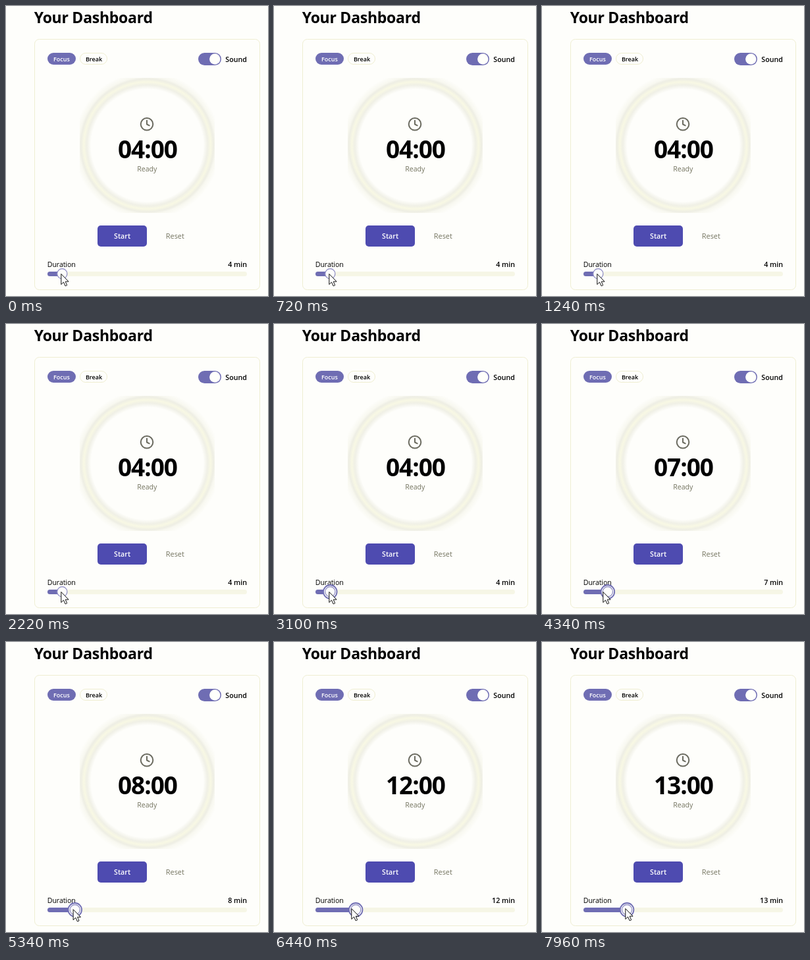
Write an HTML page that moves like this. It is 398 px wide and 440 px high and loops after 8 s.

```html
<!DOCTYPE html>
<html lang="en">
<head>
<meta charset="utf-8">
<title>Focus timer</title>
<style>
  html, body { margin: 0; width: 100%; height: 100%; overflow: hidden; background: #fefefb; }
  svg { display: block; width: 398px; height: 440px; }
  text { font: 400 10.6px "Open Sans", "Noto Sans", sans-serif; fill: #000; }
  .title { font-size: 23px; font-weight: 700; letter-spacing: -.26px; }
  .pill { font-size: 9px; font-weight: 600; }
  .medium { font-size: 10.7px; font-weight: 600; }
  .clock { font-size: 37px; font-weight: 700; letter-spacing: -.028em; }
  .label { font-weight: 500; letter-spacing: -.08px; }
  .muted { fill: #73735f; }
  .light { fill: #fff; }
  .mid { text-anchor: middle; }
  .end { text-anchor: end; }
  .violet { fill: #6f6db3; }
  .line { fill: none; stroke: #efeed2; }
  .icon { fill: none; stroke: #6b6b60; stroke-width: 2; stroke-linecap: round; stroke-linejoin: round; }
</style>
</head>
<body>
<svg viewBox="0 0 398 440">
  <defs>
    <radialGradient id="glow" gradientUnits="userSpaceOnUse" cx="214.5" cy="211.5" r="112">
      <stop offset=".76" stop-color="#fefefb"/>
      <stop offset=".82" stop-color="#f0f0e6"/>
      <stop offset=".86" stop-color="#f8f8e4"/>
      <stop offset=".9" stop-color="#eeeee4"/>
      <stop offset=".93" stop-color="#f8f8f0"/>
      <stop offset="1" stop-color="#fefefb"/>
    </radialGradient>
  </defs>

  <text class="title" x="42.7" y="26">Your Dashboard</text>
  <rect class="line" x="43.5" y="50.5" width="342" height="380" rx="7"/>

  <rect class="violet" x="63" y="71" width="43" height="18" rx="9"/>
  <text class="pill light mid" x="84.5" y="83.5">Focus</text>
  <rect class="line" x="112.5" y="71.5" width="41" height="17" rx="8.5"/>
  <text class="pill mid" x="133.5" y="83.5">Break</text>

  <rect class="violet" x="292" y="71" width="35" height="19" rx="9.5"/>
  <circle cx="317.3" cy="80.5" r="8.2" fill="#fffffb"/>
  <text class="medium end" x="366" y="84.5">Sound</text>

  <rect x="112" y="109" width="205" height="205" fill="url(#glow)"/>
  <circle class="icon" cx="214" cy="179.3" r="9.3"/>
  <path class="icon" d="M214 173.8v5.7l3.7 1.8"/>
  <text class="clock mid" id="clock" x="214.9" y="231">04:00</text>
  <text class="muted mid" x="214.3" y="251">Ready</text>

  <rect x="139" y="333" width="75" height="32" rx="5" fill="#4e4bb0"/>
  <text class="medium light mid" x="176.6" y="353">Start</text>
  <text class="muted mid" x="256.8" y="353" style="font-size:10.9px">Reset</text>

  <text class="label" x="62.8" y="396">Duration</text>
  <text class="medium end" id="minutes" x="366" y="396">4 min</text>
  <rect x="63" y="403" width="303" height="7" rx="3.5" fill="#f6f6e6"/>
  <rect class="violet" id="range" x="63" y="403" width="22" height="7" rx="3.5"/>
  <g id="thumb">
    <circle id="halo" r="10.3" fill="#fefefb" stroke="#6f6db3" stroke-width="1.8"/>
    <circle r="7.6" fill="#fefefb" stroke="#8886c2" stroke-width="1.2"/>
  </g>
  <path id="cursor" d="M0 0V16L3.7 12.5 6.3 18.3 8.9 17.2 6.4 11.6H11.3Z"
        fill="#fff" stroke="#111" stroke-linejoin="round"/>
</svg>
<script>
  const LOOP = 8000, PRESS = 2800;
  const TRACK = { x: 63, width: 303, y: 406.3, pad: 8, min: 1, max: 60 };
  // [time, minutes]
  const values = [[0, 4], [3550, 5], [3850, 6], [4150, 7], [4900, 8], [5400, 9],
                  [5800, 10], [6050, 11], [6300, 12], [7000, 13]];
  // [time, x, y]
  const path = [[0, 83.8, 406.5], [3400, 83.8, 406.5], [4340, 92.8, 406.5],
                [5650, 105, 405.5], [6440, 117.8, 404.5], [7400, 126.8, 404.5], [LOOP, 126.8, 404.5]];
  const el = id => document.getElementById(id);
  const place = (id, x, y) => el(id).setAttribute("transform", `translate(${x} ${y})`);

  function cursorAt(t) {
    const i = path.findIndex(p => p[0] > t);
    const a = path[i - 1], b = path[i];
    const k = (t - a[0]) / (b[0] - a[0]);
    return [a[1] + (b[1] - a[1]) * k, a[2] + (b[2] - a[2]) * k];
  }

  function thumbX(value) {
    const part = (value - TRACK.min) / (TRACK.max - TRACK.min);
    return TRACK.x + part * TRACK.width + TRACK.pad * (1 - 2 * part);
  }

  function draw(t) {
    const value = values.filter(v => v[0] <= t).pop()[1];
    const x = thumbX(value);
    el("clock").textContent = String(value).padStart(2, "0") + ":00";
    el("minutes").textContent = value + " min";
    el("range").setAttribute("width", x - TRACK.x);
    el("halo").style.display = t < PRESS ? "none" : "";
    place("thumb", x - .3, TRACK.y);
    place("cursor", ...cursorAt(t));
  }

  const start = performance.now();
  function tick() {
    draw((performance.now() - start) % LOOP);
    requestAnimationFrame(tick);
  }
  tick();
</script>
</body>
</html>
```
